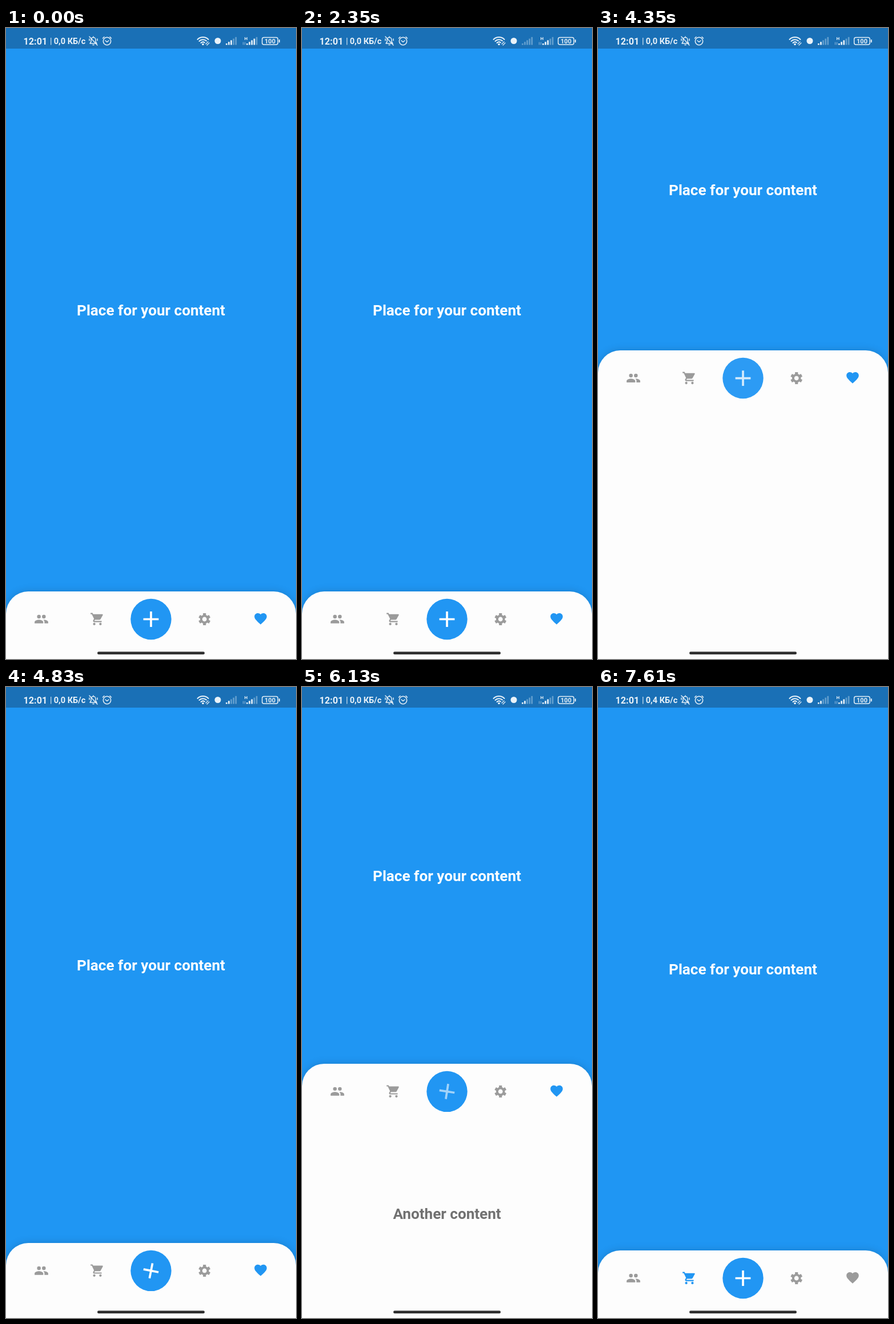
Write an HTML page that moves like this. It is 508 px wide and 1102 px high and loops after 7650 ms.

```html
<!DOCTYPE html>
<html lang="en">
<head>
<meta charset="utf-8">
<title>Expandable bottom bar</title>
<style>
html, body { margin: 0; width: 100%; height: 100%; overflow: hidden; background: #1f96f3; }
svg { display: block; }
text { font-family: Roboto, sans-serif; font-weight: 700; fill: #fff; }
.title { font-size: 26.1px; text-anchor: middle; }
#sheet { filter: drop-shadow(0 0 7px rgba(0, 0, 0, .16)); }
.status { fill: none; stroke: #e4eff8; stroke-width: 1.5; stroke-linecap: round; stroke-linejoin: round; }
.status text, .solid { fill: #e9f2f9; stroke: none; }
</style>
</head>
<body>
<svg width="508" height="1102" viewBox="0 0 508 1102">
  <rect width="508" height="1102" fill="#1f96f3"/>
  <text id="main" class="title" x="254">Place for your content</text>

  <g id="sheet">
    <path d="M0 600V39A39 39 0 0 1 39 0H469A39 39 0 0 1 508 39V600Z" fill="#fdfdfd"/>
    <g transform="translate(62 48.3) scale(1.08) translate(-12 -12)" fill="#9b9b9b">
      <circle cx="8" cy="8" r="3"/><circle cx="16" cy="8" r="3"/>
      <path d="M8 13c-2.33 0-7 1.17-7 3.5V19h14v-2.5c0-2.33-4.67-3.5-7-3.5zM16 13c-.29 0-.62.02-.97.05 1.16.84 1.97 1.97 1.97 3.45V19h6v-2.5c0-2.33-4.67-3.5-7-3.5z"/>
    </g>
    <g id="cart" transform="translate(160 48.3) scale(1.08) translate(-12 -12)">
      <circle cx="7" cy="20" r="2"/><circle cx="17" cy="20" r="2"/>
      <path d="M1 2v2h2l3.6 7.59-1.35 2.45c-.16.28-.25.61-.25.96 0 1.1.9 2 2 2h12v-2H7.42c-.14 0-.25-.11-.25-.25l.03-.12.9-1.63h7.45c.75 0 1.41-.41 1.75-1.03l3.58-6.49c.08-.14.12-.31.12-.48 0-.55-.45-1-1-1H5.21l-.94-2z"/>
    </g>
    <circle cx="254" cy="48.5" r="35.7" fill="#2196f3"/>
    <circle id="ripple" cx="254" cy="48.5" r="35.7" fill="#fff"/>
    <path id="plus" d="M-13.4 0H13.4M0-13.4V13.4" stroke="#fff" stroke-width="3.7"/>
    <g id="gear" transform="translate(347.7 48.5) scale(1.08)" stroke="#9b9b9b" fill="none">
      <circle r="5.4" stroke-width="3.6"/>
    </g>
    <path id="heart" transform="translate(446 47.6) scale(1.08) translate(-12 -12)" d="M12 21.35l-1.45-1.32C5.4 15.36 2 12.28 2 8.5 2 5.42 4.42 3 7.5 3c1.74 0 3.41.81 4.5 2.09C13.09 3.81 14.76 3 16.5 3 19.58 3 22 5.42 22 8.5c0 3.78-3.4 6.86-8.55 11.54z"/>
  </g>
  <text id="extra" class="title" x="254" style="fill:#717171">Another content</text>
  <rect x="160" y="1089.3" width="188" height="4.8" rx="2.4" fill="#303030"/>

  <rect width="508" height="36" fill="#1a70b6"/>
  <g class="status">
    <text x="30.5" y="28.5" font-size="16.2">12:01</text>
    <text x="77" y="28" font-size="14.6" style="font-weight:400">|</text>
    <text id="speed" x="83.7" y="28" font-size="14.6"></text>
    <path d="M147 27H159L157 24V20.500A4 4 0 0 0 149 20.500V24ZM152 29.500H154M153 16V15M146 15L160 30M146 19V22M160 19V22"/>
    <circle cx="177" cy="23" r="6.700"/>
    <path d="M174 22L177 24.500 180 22M169.500 18L172 15.500M184.500 18L182 15.500"/>
    <path stroke-width="2" d="M335.500 20A13.500 13.500 0 0 1 354.500 20M338.500 23A9 9 0 0 1 351 22.500M341.500 26A5 5 0 0 1 348 25.500"/>
    <circle class="solid" cx="345" cy="28.500" r="1.800"/>
    <path stroke-width="1.200" d="M350 28L354 24M352 30L356 26"/>
    <circle class="solid" cx="371" cy="22.500" r="5.500"/>
    <text x="417.500" y="20.500" font-size="8">H</text>
    <path stroke-width="1" opacity=".6" d="M415.500 25V29M418.500 25V29"/>
    <g id="signals" class="solid"></g>
    <rect x="448.700" y="16.500" width="27.500" height="12.500" rx="3"/>
    <rect class="solid" x="477.800" y="20" width="2" height="5.500" rx="1"/>
    <text x="462.500" y="26.800" font-size="11" text-anchor="middle">100</text>
  </g>
</svg>
<script>
const LOOP = 7650, SLIDE = 540, CLOSED = 984, TRAVEL = 421;
const BLUE = '#2196f3', GREY = '#9b9b9b';
const cycles = [[1147, 1780], [2813, 4348], [5757, 6610]]; // sheet opens, sheet closes
const $ = id => document.getElementById(id);
const clamp = x => Math.min(1, Math.max(0, x));
const ramp = (t, start, length) => clamp((t - start) / length);
const ease = x => x * x * (3 - 2 * x);
const sum = f => cycles.reduce((total, [open, close]) => total + f(open, close), 0);

function add(parent, tag, attrs) {
  const node = document.createElementNS(parent.namespaceURI, tag);
  for (const key in attrs) node.setAttribute(key, attrs[key]);
  return parent.appendChild(node);
}

for (let i = 0; i < 6; i++)
  add($('gear'), 'path', { d: 'M0-6.5V-9.7', 'stroke-width': 4.8, transform: `rotate(${i * 60})` });

const signals = [[385, 4.1], [421, 4.2]].map(([x, step]) =>
  [0, 1, 2, 3, 4].map(i => {
    const height = 2.5 + i * 2.8;
    return add($('signals'), 'rect', { x: x + i * step, y: 29.5 - height, width: 2.7, height });
  }));

const pulse = (t, start) => ramp(t, start, 150) - ramp(t, start + 150, 300);

function draw(t) {
  const open = sum((o, c) => ease(ramp(t, o, SLIDE)) - ease(ramp(t, c, SLIDE)));
  const dim = sum((o, c) => ramp(t, o, 400) - ramp(t, c - 150, 280));
  const shown = sum((o, c) => ramp(t, o + 100, 200) - ramp(t, c - 150, 140));
  const tap = sum((o, c) => pulse(t, o - 187) + pulse(t, c - 150));
  const top = CLOSED - TRAVEL * open;

  $('sheet').setAttribute('transform', `translate(0 ${top})`);
  $('main').setAttribute('y', top / 2 + 10);
  $('extra').setAttribute('y', (top + 1180) / 2 + 10);
  $('extra').setAttribute('opacity', shown);
  $('plus').setAttribute('transform', `translate(254 48.5) rotate(${360 * open})`);
  $('plus').setAttribute('opacity', 1 - 0.45 * dim);
  $('ripple').setAttribute('opacity', 0.05 * tap);

  const cartActive = t >= 7570;
  $('cart').setAttribute('fill', cartActive ? BLUE : GREY);
  $('heart').setAttribute('fill', cartActive ? GREY : BLUE);
  $('speed').textContent = t < 6700 ? '0,0 КБ/c' : '0,4 КБ/c';
  const lit = t < 650 ? [3, 4] : t < 3700 ? [0, 3] : [2, 3];
  signals.forEach((bars, k) =>
    bars.forEach((bar, i) => bar.setAttribute('opacity', i < lit[k] ? 1 : 0.35)));
}

const begin = performance.now();
function tick() {
  draw((performance.now() - begin) % LOOP);
  requestAnimationFrame(tick);
}
tick();
</script>
</body>
</html>
```
